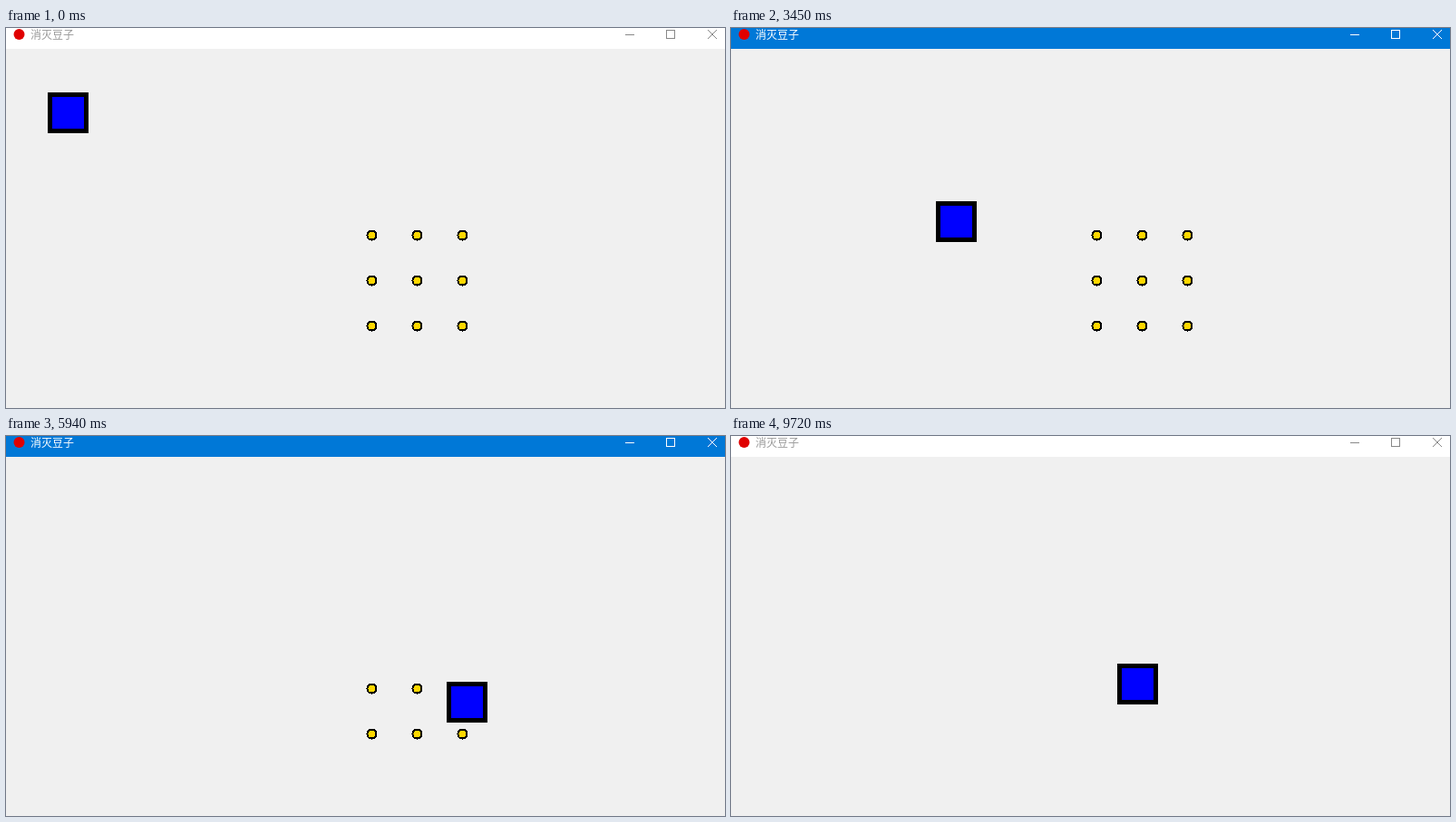
Write an HTML page that moves like this. It is 793 by 419 pixels and loops after 9.78 s.

```html
<!DOCTYPE html>
<html lang="zh">
<head>
<meta charset="utf-8">
<title>消灭豆子</title>
<style>
  html, body { margin: 0; width: 100%; height: 100%; overflow: hidden; background: #f0f0f0; }
  svg { display: block; width: 100vw; height: 100vh; }
  text { font: 12px "Noto Sans CJK SC", "Noto Sans CJK", sans-serif; }
</style>
</head>
<body>
<svg viewBox="0 0 793 419">
  <rect width="793" height="419" fill="#f0f0f0"/>
  <rect id="bar" width="793" height="23"/>
  <circle cx="14.5" cy="7" r="6" fill="#e00000"/>
  <text id="label" x="27" y="12">消灭豆子</text>
  <g id="controls" fill="none">
    <path d="M683 7.5h10M728.5 2.5h9v9h-9z" shape-rendering="crispEdges"/>
    <path d="M774 2l10 10M784 2l-10 10"/>
  </g>
  <g id="beans" fill="#ffd700" stroke="#000" stroke-width="2" shape-rendering="crispEdges"></g>
  <rect id="player" width="40" height="40" fill="#00f" stroke="#000" stroke-width="5" shape-rendering="crispEdges"/>
</svg>
<script>
const LOOP = 9780, STEP = 20, SIZE = 45, BEAN = 6;
const START = { x: 46, y: 71 };
const FADE = { from: 60, to: 390, steps: 5, off: 9720 };
const DIRS = { R: [1, 0], L: [-1, 0], D: [0, 1], U: [0, -1] };
const ROUTE = 'D5 R6 D1 R15 R1 D6 L5 U3 R2';
// Bursts of key presses: first time, last time, count
const BURSTS = [
  [1170, 1170, 1], [1290, 1740, 4], [2070, 2580, 4], [2730, 3000, 3],
  [3120, 3990, 7], [4170, 4440, 3], [4560, 5160, 5], [5340, 5940, 5],
  [6090, 6210, 2], [6390, 7410, 8], [7560, 7710, 2]
];

const $ = id => document.getElementById(id);
const set = (el, attrs) => {
  for (const key in attrs) el.setAttribute(key, attrs[key]);
};
const mix = (a, b, k) =>
  `rgb(${a.map((v, i) => Math.round(v + (b[i] - v) * k)).join(',')})`;

const times = BURSTS.flatMap(([from, to, n]) =>
  Array.from({ length: n }, (_, i) =>
    Math.round((from + (to - from) * i / Math.max(1, n - 1)) / 30) * 30));
const moves = ROUTE.split(' ').flatMap(run =>
  Array(+run.slice(1)).fill(DIRS[run[0]]));

const path = [{ ...START, time: 0 }];
moves.forEach(([dx, dy], i) => {
  const last = path[i];
  path.push({ x: last.x + dx * STEP, y: last.y + dy * STEP, time: times[i] });
});

const inside = (v, edge) => edge <= v - BEAN && v + BEAN <= edge + SIZE;

const beans = Array.from({ length: 9 }, (_, i) => {
  const cx = 403.5 + 50 * (i % 3), cy = 228.5 + 50 * Math.floor(i / 3);
  const el = document.createElementNS($('beans').namespaceURI, 'circle');
  set(el, { cx, cy, r: 5 });
  $('beans').append(el);
  const hit = path.find(p => inside(cx, p.x) && inside(cy, p.y));
  return { el, eaten: hit ? hit.time : Infinity };
});

function focusAt(t) {
  if (t < FADE.from || t >= FADE.off) return 0;
  const gap = (FADE.to - FADE.from) / (FADE.steps - 1);
  return Math.min(1, (Math.floor((t - FADE.from) / gap) + 1) / FADE.steps);
}

function draw(t) {
  const focus = focusAt(t);
  const white = [255, 255, 255];
  set($('bar'), { fill: mix(white, [0, 120, 215], focus) });
  set($('label'), { fill: mix([153, 153, 153], white, focus) });
  set($('controls'), { stroke: mix([136, 136, 136], white, focus) });

  const pos = path.filter(p => p.time <= t).pop();
  set($('player'), { x: pos.x + 2.5, y: pos.y + 2.5 });
  for (const { el, eaten } of beans) {
    set(el, { visibility: t < eaten ? 'visible' : 'hidden' });
  }
}

const begin = performance.now();
function tick() {
  draw((performance.now() - begin) % LOOP);
  requestAnimationFrame(tick);
}
tick();
</script>
</body>
</html>
```
